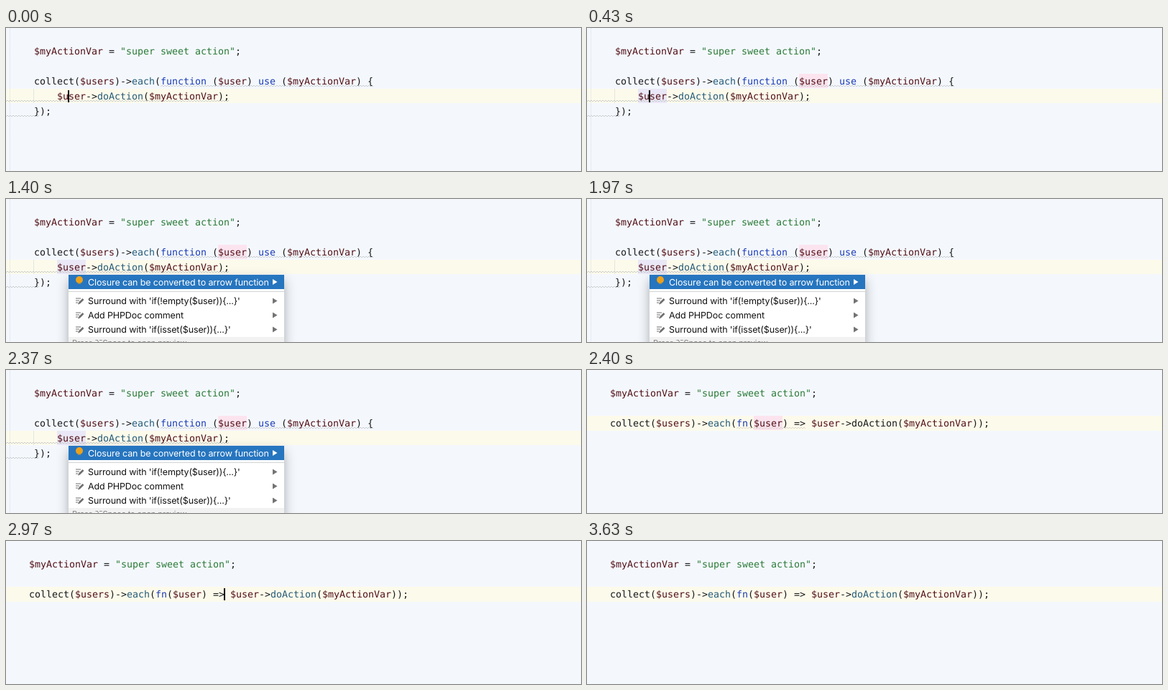
Write an HTML page that moves like this. It is 800 px wide and 200 px high and loops after 3.66 s.

```html
<!DOCTYPE html>
<html lang="en">
<head>
<meta charset="utf-8">
<title>Closure to arrow function</title>
<style>
  html, body { margin: 0; width: 100%; height: 100%; overflow: hidden; background: #f4f8fd; }
  svg { display: block; width: 800px; height: 200px; }
  text { white-space: pre; text-rendering: geometricPrecision; }
  .code { font: 13.29px "DejaVu Sans Mono", "Noto Sans Mono", monospace; fill: #17181a; }
  .var { fill: #521016; }
  .str { fill: #2b7a37; }
  .key { fill: #1a3bb4; }
  .call { fill: #255b78; }
  .pending .late { fill: #17181a; }
  .wave { fill: none; stroke: #bfc3c4; stroke-width: .8; }
  .menu { font: 12.5px Inter, "Open Sans", sans-serif; letter-spacing: -.12px; fill: #111; }
  .hint { font-size: 11px; fill: #858585; }
</style>
</head>
<body>
<svg viewBox="0 0 800 200" xmlns="http://www.w3.org/2000/svg">
  <defs>
    <filter id="shadow" x="-20%" y="-40%" width="140%" height="180%">
      <feDropShadow dx="0" dy="7" stdDeviation="8" flood-color="#000" flood-opacity=".32"/>
    </filter>
  </defs>
  <rect width="800" height="200" fill="#f4f8fd"/>
  <g id="before"></g>
  <g id="after"></g>
  <rect id="caret" width="2" height="17" fill="#000"/>
  <g id="popup" class="menu"></g>
</svg>
<script>
const LOOP = 3660;
const HIGHLIGHT_ON = 30, CARET_OFF = 830, POPUP_OPEN = 1330, CONVERTED = 2400,
      ANALYSED = 2700, CARET_ON = 2900, CARET_OFF_AGAIN = 3400;
const COL = 8, ROW = 21, BASE = 37;

const $ = id => document.getElementById(id);

function add(parent, tag, attrs, content) {
  const el = document.createElementNS("http://www.w3.org/2000/svg", tag);
  for (const key in attrs) el.setAttribute(key, attrs[key]);
  if (content) el.textContent = content;
  parent.appendChild(el);
  return el;
}

const rect = (parent, x, y, width, height, fill) =>
  add(parent, "rect", { x, y, width, height, fill });

const path = (parent, d, attrs) => add(parent, "path", { d, ...attrs });

function tokenClass(token) {
  if (token[0] === "$") return "var";
  if (token[0] === '"') return "str";
  if (/^(function|use|fn)$/.test(token)) return "key";
  if (token === "each") return "call";
  if (token === "doAction") return "call late";
  return "";
}

// Places every token on the character grid.
function codeLine(parent, left, row, source) {
  for (const m of source.matchAll(/"[^"]*"|\$?\w+|[^\s\w$"]+/g)) {
    add(parent, "text", {
      class: "code " + tokenClass(m[0]), x: left + m.index * COL, y: BASE + row * ROW
    }, m[0]);
  }
}

function wave(parent, from, to, y) {
  let d = `M${from} ${y + 1}`;
  for (let x = from + 2, up = true; x <= to; x += 2, up = !up) d += `L${x} ${up ? y - 1 : y + 1}`;
  return path(parent, d, { class: "wave" });
}

function buildBefore(g) {
  rect(g, 0, 85, 800, 20, "#fcfaeb");
  path(g, "M5.5 0V200", { stroke: "#d9dde3", "stroke-dasharray": "1 1" });
  path(g, "M38.5 85V105", { stroke: "#e5e5de" });
  const marks = add(g, "g", { id: "marksBefore" });
  rect(marks, 295, 64, 40, 20, "#fce4ef");
  rect(marks, 71, 85, 40, 20, "#eae7f6");
  wave(g, 215, 511, 81);
  wave(g, 0, 311, 102);
  wave(g, 0, 47, 123);
  codeLine(g, 39, 0, '$myActionVar = "super sweet action";');
  codeLine(g, 39, 2, "collect($users)->each(function ($user) use ($myActionVar) {");
  codeLine(g, 39, 3, "    $user->doAction($myActionVar);");
  codeLine(g, 39, 4, "});");
}

function buildAfter(g) {
  rect(g, 0, 64, 800, 21, "#fcfaeb");
  const marks = add(g, "g", { id: "marksAfter" });
  rect(marks, 232, 64, 40, 20, "#fce4ef");
  wave(marks, 208, 304, 81).style.stroke = "#d5cdc6";
  codeLine(g, 32, 0, '$myActionVar = "super sweet action";');
  codeLine(g, 32, 2, "collect($users)->each(fn($user) => $user->doAction($myActionVar));");
}

function menuRow(g, y, label, color, arrow) {
  add(g, "text", { x: 114, y: y + 4.5, fill: color }, label);
  path(g, `M371 ${y - 4}L377.5 ${y}L371 ${y + 4}Z`, { fill: arrow });
}

function editIcon(g, y) {
  path(g, `M97 ${y - 3.5}H104M97 ${y - .5}H102M97 ${y + 2.5}H100`, { stroke: "#6e6e6e" });
  path(g, `M102 ${y + 3}L107.5 ${y - 2.5}`, { stroke: "#6e6e6e", "stroke-width": 2.6 });
  path(g, `M100 ${y + 5}L101 ${y + 2}L103 ${y + 4}Z`, { fill: "#6e6e6e" });
}

function buildPopup(g) {
  add(g, "rect", { x: 87, y: 106, width: 300, height: 108, fill: "#fff", filter: "url(#shadow)" });
  rect(g, 87, 106, 300, 20, "#2675bf");
  add(g, "circle", { cx: 102, cy: 113, r: 5, fill: "#eda11b" });
  path(g, "M99.5 118.5H104.5", { stroke: "#8a8468" });
  menuRow(g, 116, "Closure can be converted to arrow function", "#fff", "#fff");
  rect(g, 87, 129, 300, 1, "#d2d2d2");
  ["Surround with 'if(!empty($user)){...}'", "Add PHPDoc comment", "Surround with 'if(isset($user)){...}'"]
    .forEach((label, i) => {
      const y = 142.5 + i * 20;
      if (i !== 1 || label) editIcon(g, y);
      menuRow(g, y, label, "#111", "#737373");
    });
  rect(g, 87, 193, 300, 21, "#f2f2f2");
  add(g, "text", { class: "hint", x: 92, y: 205 }, "Press ⌥Space to open preview");
}

const show = (id, on) => $(id).setAttribute("visibility", on ? "inherit" : "hidden");

function render(t) {
  const converted = t >= CONVERTED;
  show("before", !converted);
  show("after", converted);
  show("marksBefore", t >= HIGHLIGHT_ON);
  show("marksAfter", t < ANALYSED);
  $("after").classList.toggle("pending", t < ANALYSED);
  show("popup", t >= POPUP_OPEN && !converted);
  show("caret", t < CARET_OFF || (t >= CARET_ON && t < CARET_OFF_AGAIN));
  $("caret").setAttribute("x", converted ? 303 : 86);
  $("caret").setAttribute("y", converted ? 66 : 87);
}

buildBefore($("before"));
buildAfter($("after"));
buildPopup($("popup"));

const start = performance.now();
function tick() {
  render((performance.now() - start) % LOOP);
  requestAnimationFrame(tick);
}
tick();
</script>
</body>
</html>
```
